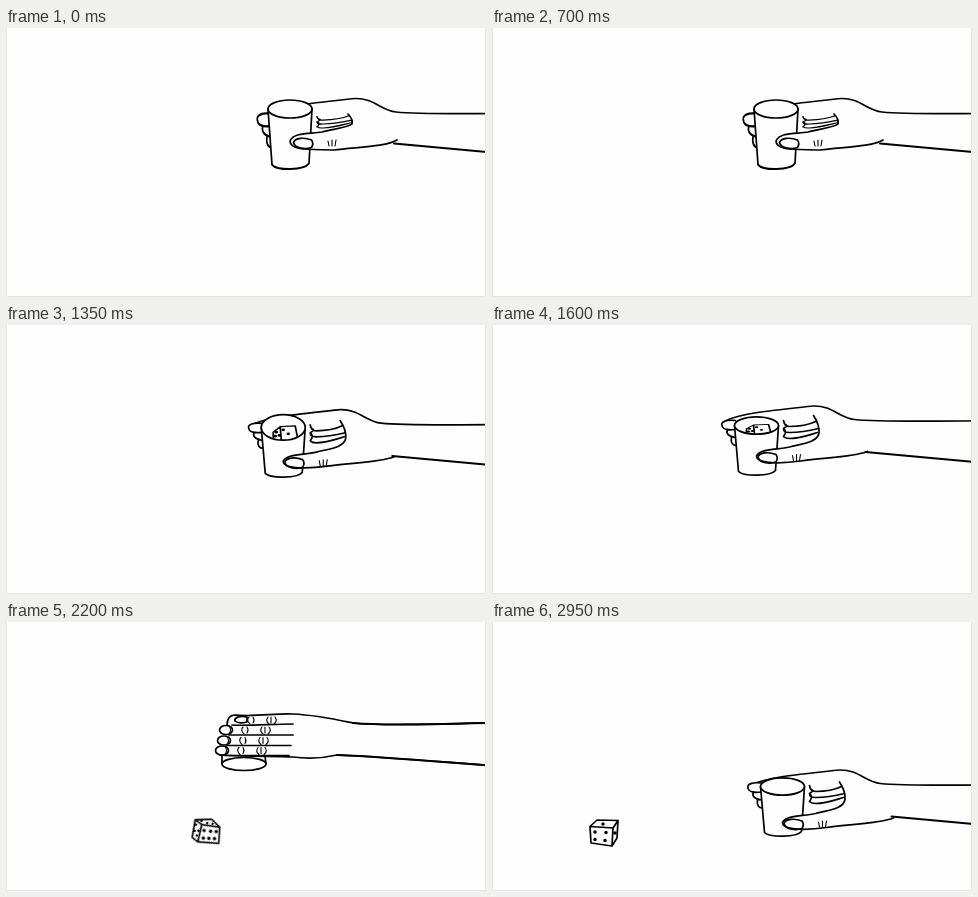
An HTML page without scripts that plays this animation: 480x269 px, repeating every 3000 ms.

```html
<!DOCTYPE html>
<html lang="en">
<head>
<meta charset="utf-8">
<title>Dice cup</title>
<style>
/* hand rig: cup place, rim height, low grip, sagging palm, die in cup */
@property --x { syntax: "<number>"; inherits: true; initial-value: 284; }
@property --y { syntax: "<number>"; inherits: true; initial-value: 81; }
@property --rim { syntax: "<number>"; inherits: true; initial-value: 9; }
@property --low { syntax: "<number>"; inherits: true; initial-value: 0; }
@property --sag { syntax: "<number>"; inherits: true; initial-value: 0; }
@property --full { syntax: "<number>"; inherits: true; initial-value: 1; }

html, body { margin: 0; width: 100%; height: 100%; overflow: hidden; background: #fefefe; }
svg { display: block; width: 100%; height: 100%; }
path, ellipse { fill: none; stroke: #000; stroke-width: 1.7; stroke-linecap: round; stroke-linejoin: round; }
.solid { fill: #fefefe; }
.bold { stroke-width: 2; }
.fine { stroke-width: 1.1; }
.pips { stroke-width: 3.5; }
.small { stroke-width: 2.4; }
.move { animation: 3s ease-in-out infinite; }
.roll { animation: 3s linear infinite; }
.cut { animation: 3s step-end infinite; }

#hand { animation-name: act; transform: translate(calc(var(--x) * 1px), calc(var(--y) * 1px)); }
#back { transform: translate(calc(var(--low) * 8px), calc(var(--low) * 9px + var(--sag) * 3px)); }
#tips { transform: translate(calc(var(--low) * 2px), calc(var(--low) * 11.5px + var(--sag) * 1.5px)) scaleY(calc(1 + var(--low) * .35)); }
#body { transform: scaleY(calc(1 + var(--low) * .21)); }
#rim { ry: calc(var(--rim) * 1px); }
#inside { transform: scaleY(calc(var(--rim) / 16)); opacity: calc((var(--full) - var(--low) - .5) * 99); }
#grip { transform: translateY(calc(var(--sag) * 5.5px)); }
#nail { transform: translate(calc(var(--low) * 2px), calc(var(--low) * 2px)); }
#arm { transform: translate(calc(var(--low) * -5px), calc(var(--low) * 8px + var(--sag) * 3.5px)); }
#fingers { transform: translateY(calc(var(--low) * 12px + var(--sag) * 4px)) scaleY(calc(1 - var(--low) * .35)) skewY(calc(var(--low) * -4deg)); }
#thumb {
  --open: path("M111 26C96 32 66 32 44 35.5C27 38 0 39 0 30.5C4 23 20 24.5 33 21.5C46 18 61 17 62.5 7.5C63 2 61-4 57-10");
  --shut: path("M107 31C96 38 66 38 44 41C26 40 0 43 0 32C4 23 20 25 32 23C44 20 59 18 62 15C63 11 61 8 58 5");
  animation-name: thumb;
}
@keyframes act {
  0%, 1.667%, 23.333%, 25% { --x: 284; --y: 81; --rim: 9; --low: 1; --sag: 0; --full: 1; }
  11.667%, 13.333%, 36.667%, 38.333% { --x: 284.5; --y: 85; --rim: 15.5; --low: 0; --sag: 1; }
  46% { --x: 277; --y: 103; }
  53.333%, 54.99% { --x: 264.5; --y: 100.5; --rim: 8.7; --low: 0; --sag: 0; --full: 1; }
  55%, 57% { --x: 241.5; --y: 111.5; --rim: 8.7; --low: 0; --sag: 0; --full: 1; }
  93.333% { --x: 237; --y: 66.5; --full: 0; }
  98.333%, 100% { --x: 290.5; --y: 164.5; --rim: 8.7; --low: 0; --sag: 1; --full: 0; }
}
@keyframes thumb {
  0%, 1.667%, 23.333%, 25% { d: var(--shut); }
  11.667%, 13.333%, 36.667%, 100% { d: var(--open); }
}

/* cut between the two views */
#upright { animation-name: upright; }
#over { animation-name: over; }
#pour { animation-name: pour; }
@keyframes upright { 0%, 93.333%, 100% { opacity: 1; } 56.667% { opacity: 0; } }
@keyframes over { 0%, 93.333%, 100% { opacity: 0; } 56.667% { opacity: 1; } }
@keyframes pour {
  0%, 56.667% { transform: translate(-12px, -12px); }
  60%, 86.667% { transform: none; }
  91.667%, 100% { transform: translateY(-17px); }
}

/* die: drop, bounce, roll, rest */
#die { animation-name: travel; }
#spin { animation-name: spin; }
#six { animation-name: six; }
#four { animation-name: four; }
#rest { animation-name: rest; }
@keyframes travel {
  0%, 58.333% { transform: translate(247px, 145px); }
  63.333%, 65% { transform: translate(260px, 196.5px); }
  66.667% { transform: translate(250px, 211px); }
  69.5% { transform: translate(229px, 201px); }
  73.333% { transform: translate(201px, 210px); }
  85%, 86.667% { transform: translate(118px, 208px); }
  91.667%, 100% { transform: translate(112px, 211px); }
}
@keyframes spin {
  0%, 58.333% { transform: rotate(40deg); }
  63.333%, 65% { transform: rotate(0deg); }
  85%, 86.667% { transform: rotate(-360deg); }
  89% { transform: rotate(-372deg); }
  91.667%, 100% { transform: rotate(-360deg); }
}
@keyframes six { 0%, 75%, 100% { opacity: 0; } 58.333% { opacity: 1; } }
@keyframes four { 0%, 88.333%, 100% { opacity: 0; } 75% { opacity: 1; } }
@keyframes rest { 0% { opacity: 0; } 88.333%, 100% { opacity: 1; } }
</style>
</head>
<body>
<svg viewBox="0 0 480 269" preserveAspectRatio="none">
  <defs>
    <g id="creases" class="fine">
      <path class="fine" d="M17-3q-3 3 1 7M21-3q2 3 0 6M36-3q-3 4 1 7M39-3v6M43-3q3 4-1 7"/>
    </g>
    <g id="finger">
      <path d="M3 5H67"/>
      <ellipse class="solid" rx="6.500" ry="4.500"/>
      <path class="fine" d="M3-4Q6 0 3 4"/>
      <use href="#creases"/>
    </g>
  </defs>

  <g id="die" class="roll"><g id="spin" class="roll">
    <g id="six" class="cut">
      <path class="solid" d="M-16-4L3-13L10-12L16 5L2 13.5L-9 10.5ZM3-13L8 4L-9 10.5M8 4L16 5"/>
      <path class="pips" d="M-10-2zM-5-4.500zM0-7zM-8 5zM-3 2.500zM3 0z"/>
      <path class="pips small" d="M7-8zM8-3zM11-5zM13 1zM-1 10zM4 8zM10 7z"/>
    </g>
    <g id="four" class="cut">
      <path class="solid" d="M-12-11.5L3-14L16-4L13 9L-3 14L-17 3ZM-12-11.5L0-1L16-4M0-1L-3 14"/>
      <path class="pips" d="M-6-10zM2-11zM3-5zM9-6zM-13 3.500zM-3 1zM7 5z"/>
    </g>
    <g id="rest" class="cut">
      <path class="solid" d="M-14-6.5L-7-13L14-12.5L13 5L8 13L-13 10ZM-14-6.5L9-5L14-12.5M9-5L8 13"/>
      <path class="pips" d="M-9-1zM2-.5zM-9 6.500zM1 7.500zM-1-9zM11 0z"/>
    </g>
  </g></g>

  <g id="upright" class="cut"><g id="hand" class="move">
    <path id="back" d="M-30-5C-14-13 25-16 57-19.5C76-20 82-8 98-6C116-4 150-3 300-6"/>
    <path id="tips" class="solid" d="M-21-5C-30-6-36-4-34.5 0C-34 4-28 5-21 4M-29 4C-31 8-28 11-21 12M-25 12C-26 17-24 20-20 20"/>
    <path id="body" class="solid" d="M-22 0L-18 46C-13 51 14 51 19 45L22 0"/>
    <ellipse id="rim" class="solid" rx="22"/>
    <g id="inside">
      <path d="M-10 13V6L-3-1L12-2L14 11M-3-1L-2 15"/>
      <path class="pips" d="M0 3zM5 8zM-7 6zM-4 10zM-8 11z"/>
    </g>
    <g id="grip">
      <path id="thumb" class="move solid"/>
      <g id="nail">
        <path d="M19.500 29C12 26 3 27 1.500 31.500C3 38 14 38.500 19.500 36.500C21 34 21 31 19.500 29"/>
        <path class="fine" d="M36 30l1 5M40 29v6M44 29l-1 6"/>
      </g>
    </g>
    <path id="arm" class="bold" d="M109 26.500L300 44"/>
    <path id="fingers" d="M27-5Q28 1 33 1C45 1 53-1 59-4M27 3Q27 7 33 7C45 7 54 5 62 3M27 11Q29 13 33 13C44 13 54 9 61 7M29-1Q32 0 27 3Q31 6 27 11"/>
  </g></g>

  <g id="over" class="cut"><g id="pour" class="move">
    <path class="solid" d="M216 131V142H260L259 134"/>
    <ellipse class="solid" cx="238" cy="142" rx="22" ry="6.500"/>
    <path class="solid" d="M214 133C245 135 265 134 287 135C302 137 318 136 331 133C400 136 430 140 560 149V99C430 102 380 104 347 101C328 97 310 93 287 92C270 91 250 95 229 93C223 93 221 97 221 104"/>
    <path class="bold" d="M347 101C380 104 430 102 560 99M331 133C400 136 430 140 560 149"/>
    <path d="M226 103C245 104 265 102 287 102M241 95C233 93 228 96 229 99C232 102 237 101 241 100Z"/>
    <use href="#creases" x="226" y="98" clip-path="none"/>
    <use href="#finger" x="220" y="108"/>
    <use href="#finger" x="218" y="118.500"/>
    <use href="#finger" x="216" y="128.500"/>
  </g></g>
  <path d="M.5 0V268.500H479.500V0" style="stroke:#e6e6e6;stroke-width:1"/>
</svg>
</body>
</html>
```
